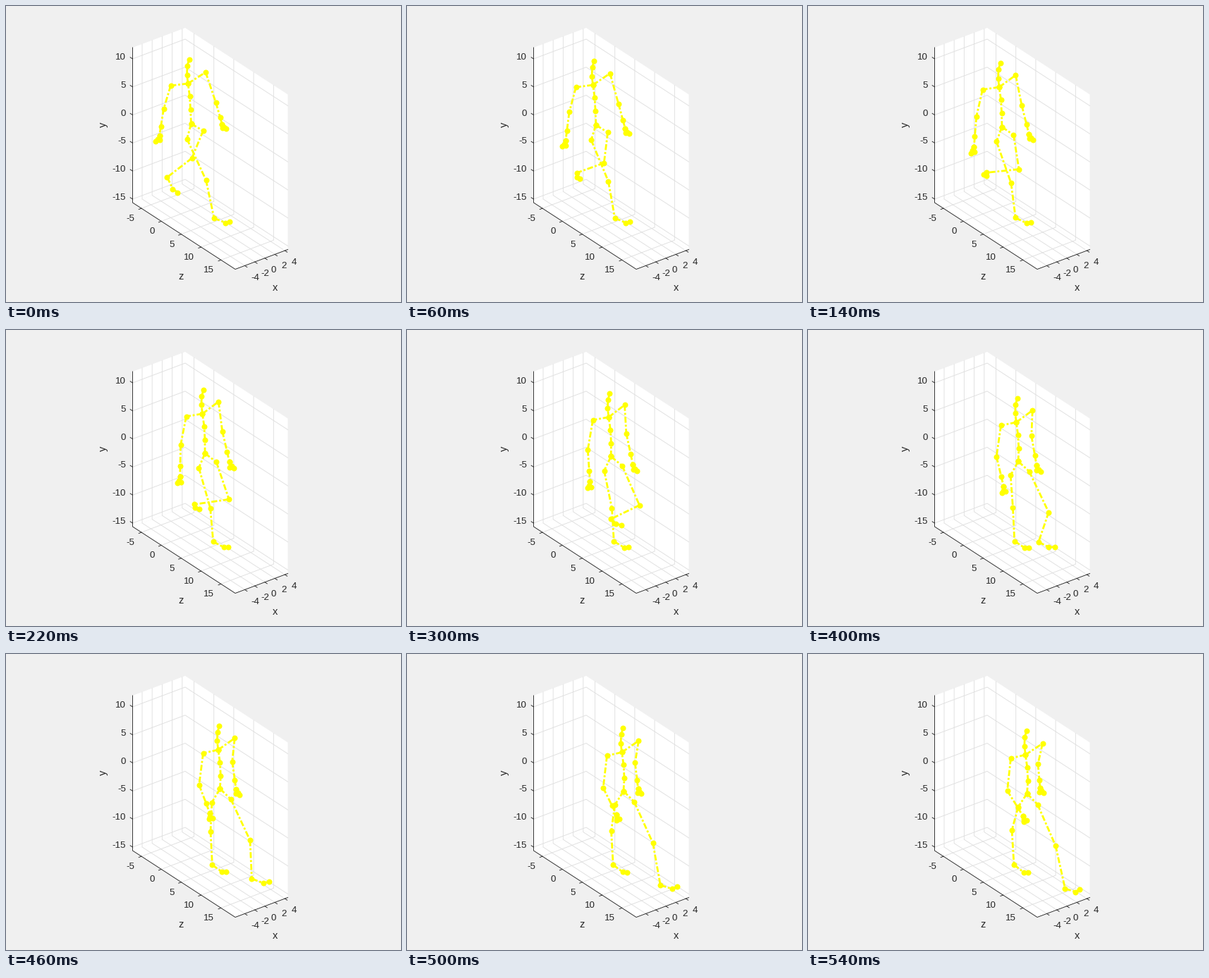
Recreate the animation shown at these times as a matplotlib script. Size 560 px wide and 420 px high, loop 560 ms.

```python
import numpy as np
import matplotlib
import matplotlib.pyplot as plt
from matplotlib.animation import FuncAnimation
from matplotlib.collections import LineCollection

matplotlib.rcParams["font.family"] = "Liberation Sans"

W, H, DPI = 560, 420, 100
FRAMES, STEP = 28, 20
PX = 72 / DPI  # points per pixel
INK = "#262626"

fig = plt.figure(figsize=(W / DPI, H / DPI), dpi=DPI, facecolor="#f0f0f0")
ax = fig.add_axes([0, 0, 1, 1])
ax.set_xlim(0.5, W + 0.5)
ax.set_ylim(H, 0)
ax.axis("off")

# Projected box: base corner and the three edge vectors
BASE = np.array([180, 279])
EX, EY, EZ = np.array([74.5, -28]), np.array([0, -220]), np.array([145.5, 94.5])
TICK_X = -EX / np.hypot(*EX) * 4
TICK_Z = EZ / np.hypot(*EZ) * 4


def at(x, y, z):
    return BASE + x * EX + y * EY + z * EZ


def stroke(*points, color=INK, **kw):
    ax.plot(*np.transpose(points), color=color, lw=0.9 * PX, **kw)


def grid(*points):
    stroke(*points, color="#dfdfdf", zorder=1)


def label(x, y, text, ha, size=13.33):
    ax.text(x, y + 0.32 * size, text, ha=ha, va="baseline",
            fontsize=size * PX, color=INK)


def draw_box():
    floor = [(0, 0, 0), (1, 0, 0), (1, 0, 1), (0, 0, 1)]
    left = [(0, 0, 0), (1, 0, 0), (1, 1, 0), (0, 1, 0)]
    back = [(1, 0, 0), (1, 0, 1), (1, 1, 1), (1, 1, 0)]
    for wall in (floor, left, back):
        ax.fill(*np.transpose([at(*p) for p in wall]), color="white", lw=0, zorder=0)

    for i, value in enumerate(range(-4, 5, 2)):
        u = (13.5 + 14.2 * i) / EX[0]
        grid(at(u, 1, 0), at(u, 0, 0), at(u, 0, 1))
        stroke(at(u, 0, 1), at(u, 0, 1) + TICK_Z)
        label(347.7 + 14.25 * i, 384.3 - 5.4 * i, value, "left")

    for i, value in enumerate(range(-5, 16, 5)):
        u = (12.5 + 28.2 * i) / EZ[0]
        grid(at(1, 1, u), at(1, 0, u), at(0, 0, u))
        stroke(at(0, 0, u), at(0, 0, u) + TICK_X)
        label(182.6 + 28.3 * i, 300.8 + 18.3 * i, value, "right")

    for i, value in enumerate(range(10, -16, -5)):
        u = (204 - 39.8 * i) / -EY[1]
        grid(at(0, u, 0), at(1, u, 0), at(1, u, 1))
        stroke(at(0, u, 0), at(0, u, 0) - TICK_Z)
        label(170.5, 71.8 + 39.8 * i, value, "right")

    stroke(at(0, 1, 0), at(0, 0, 0), at(0, 0, 1), at(1, 0, 1), zorder=2)
    label(382, 399, "x", "center", 14.67)
    label(249, 383.5, "z", "center", 14.67)
    ax.text(138, 168.5, "y", rotation=90, ha="center", va="center",
            fontsize=14.67 * PX, color=INK)


# Walk phase: 0 on the first frame, 1 on the last
phase = np.linspace(0, 1, FRAMES)[:, None]
BOB = (0, -4.8)


def glide(start, end, bow=(0, 0)):
    """Steady travel from start to end, bent sideways by bow at mid-step."""
    start, end, bow = map(np.array, (start, end, bow))
    return start + (end - start) * phase + bow * np.sin(np.pi * phase)


def through(*points):
    """Smooth curve through points of the swinging foot's path."""
    knots = np.array([0, 7, 15, 23, 27]) / 27
    fit = np.polyfit(knots, points, len(knots) - 1)
    return sum(c * phase ** k for k, c in enumerate(fit[::-1]))


def arm(neck, shoulder, elbow, wrist, side):
    """The hand continues the forearm; fingers and thumb spread sideways."""
    fore = wrist - elbow

    def reach(length, spread):
        return wrist + length * fore + np.array([side * spread, 0.5])

    palm = reach(0.49, 0)
    fingers = [reach(0.68, 1.7), reach(0.8, 4)]
    return [[neck, shoulder, elbow, wrist, palm, *fingers],
            [palm, reach(0.74, -1.2)]]


def build_walker():
    """Chains of joints; each joint is a path of one point per frame."""
    root = glide((263, 167), (311, 198), BOB)
    bend = [(-1, -20), (-2, -39), (-4.5, -57), (-6, -69.5), (-5.5, -82), (-3, -91)]
    spine = [root] + [root + glide(p, np.add(p, (2.3, 2))) for p in bend]
    neck = spine[3]

    left_arm = arm(neck,
                   glide((234, 113), (288, 148), BOB),
                   glide((224, 146), (283, 194), (0, -2.5)),
                   glide((220, 171), (298, 218), (-4.5, 3)), side=-1)
    right_arm = arm(neck,
                    glide((283.5, 94), (333, 127), (-2, -6)),
                    glide((298, 137), (326.5, 156), (-2.5, -1)),
                    glide((304, 157.5), (328.5, 178.5), (0, 7)), side=1)

    standing = [root,
                glide((257, 188.5), (298.5, 217), BOB),
                glide((284, 247), (289.5, 250), (4, 4.5)),
                glide((295.5, 301), (292.5, 299)),
                glide((311.5, 307.5), (306, 309.5)),
                glide((317.5, 306), (312, 310))]

    ankle = through((229, 243), (253, 236.5), (290, 268), (349, 319), (365, 333))
    foot = through((8, 16.5), (-3, 2.5), (7, 7), (16.5, 6), (15, 4.5))
    toe = through((15, 22), (1, 4.5), (15, 9), (24.5, 4), (21, 1))
    swinging = [root,
                glide((280, 177), (326, 213.5), BOB),
                glide((264, 216), (351.5, 272), (17.7, 1.5)),
                ankle, ankle + foot, ankle + toe]

    return [spine, *left_arm, *right_arm, standing, swinging]


draw_box()
chains = build_walker()
bones = [pair for chain in chains for pair in zip(chain, chain[1:])]
joints = [joint for chain in chains for joint in chain]

limbs = LineCollection([], colors="yellow", linewidths=2.8 * PX,
                       linestyles=[(0, (3, 1, 1, 1))], capstyle="butt", zorder=4)
ax.add_collection(limbs, autolim=False)
dots, = ax.plot([], [], "o", color="yellow", ms=8 * PX, mew=0, zorder=5)


def draw(n):
    limbs.set_segments([(a[n], b[n]) for a, b in bones])
    dots.set_data(*np.transpose([joint[n] for joint in joints]))
    return limbs, dots


anim = FuncAnimation(fig, draw, frames=FRAMES, interval=STEP,
                     repeat=True, repeat_delay=0)
plt.show()
```
